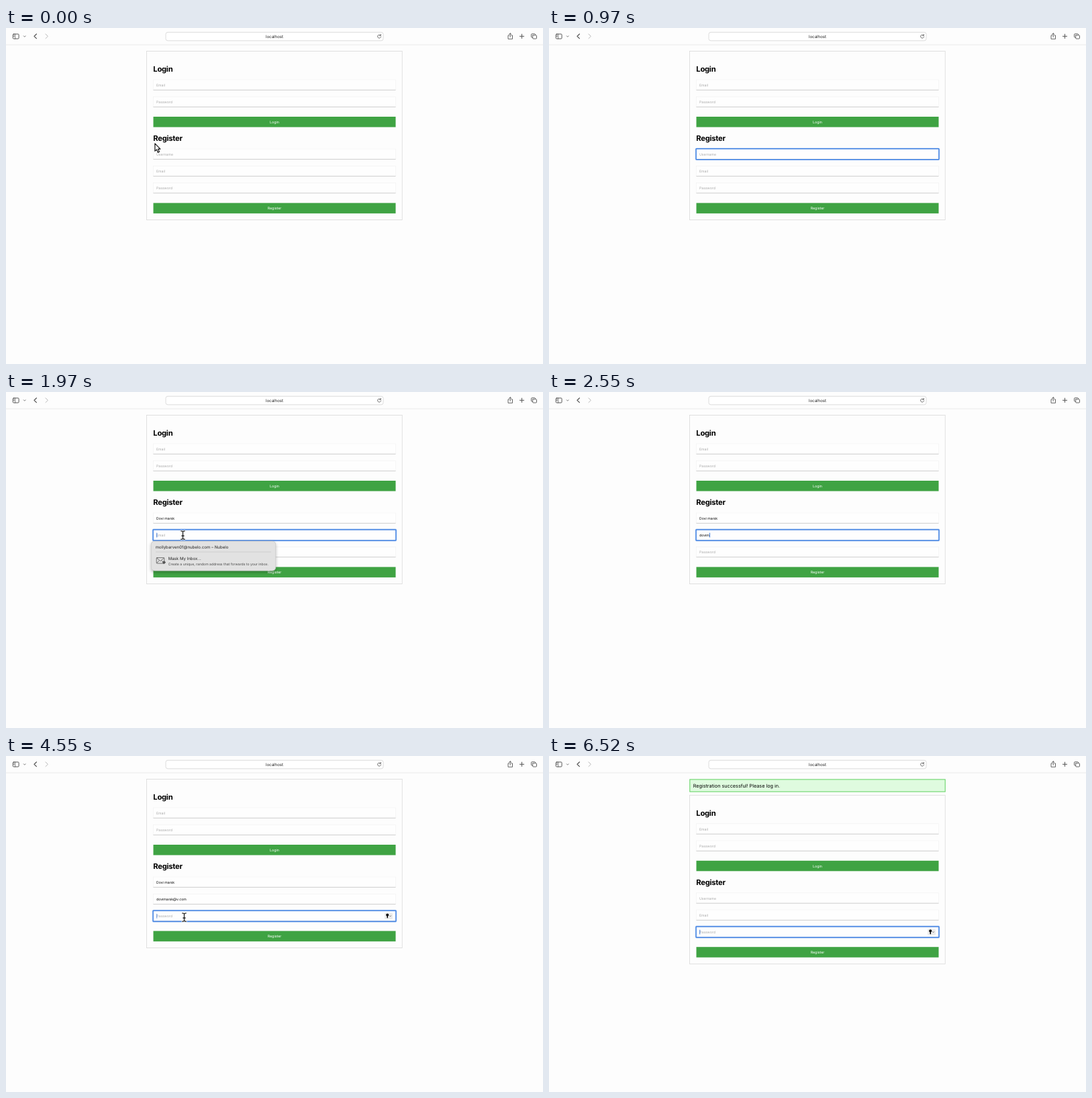
An HTML page that plays this animation: 800 px wide and 500 px high, repeating every 6.55 s.

```html
<!DOCTYPE html>
<html lang="en">
<head>
<meta charset="utf-8">
<title>Login and register</title>
<style>
html, body { margin: 0; width: 100%; height: 100%; overflow: hidden; background: #fdfdfd; }
svg { display: block; width: 800px; height: 500px; }
text { font: 5.15px Inter, "Open Sans", sans-serif; text-rendering: geometricPrecision; white-space: pre; }
.h { font-size: 11.23px; font-weight: 700; letter-spacing: -.25px; }
.ph { fill: #a9a9a9; }
.btn { font-size: 5.35px; fill: #fff; text-anchor: middle; }
.ui { font-size: 6.1px; fill: #222; }
.line { fill: none; stroke: #555; stroke-width: 1; stroke-linecap: round; stroke-linejoin: round; }
</style>
</head>
<body>
<svg id="stage" viewBox="0 0 800 500"></svg>
<script>
const LOOP = 6550, SUBMIT = 5850, DOT = 3.5;
const NAME = "Dovi marsk", EMAIL = "dovimarsk@v.com";
const $ = id => document.getElementById(id);

const field = (id, y, label) => `
  <rect x="219.6" y="${y}" width="360.8" height="15.4" fill="#fefefe" stroke="#f0f0f0" stroke-width=".6"/>
  <path d="M219.5 ${y + 15.3}H580.5" stroke="#c6c6c6" stroke-width=".8"/>
  <text id="${id}" class="ph" x="224" y="${y + 9.8}">${label}</text>`;
const button = (y, label) => `
  <rect x="219.5" y="${y}" width="361" height="15.5" fill="#3fa343"/>
  <text class="btn" x="400" y="${y + 9.9}">${label}</text>`;
const dots = [0, 1, 2, 3].map(i => `<circle cx="${226.2 + i * DOT}" cy="238.3" r="1.3"/>`).join("");

$("stage").innerHTML = `
<defs><filter id="shadow" x="-10%" y="-30%" width="120%" height="170%">
  <feDropShadow dx="0" dy="2" stdDeviation="2" flood-opacity=".28"/></filter></defs>
<rect width="800" height="500" fill="#fdfdfd"/>
<path d="M0 25H800" stroke="#ebebeb"/>
<rect x="238" y="6.3" width="324" height="12.6" rx="3" fill="#fff" stroke="#d9d9d9" stroke-width=".9"/>
<text class="ui" x="400" y="14.9" text-anchor="middle">localhost</text>
<g class="line">
  <rect x="10.3" y="9" width="8.8" height="7" rx="1.2"/>
  <path d="M13.6 9V16M11.4 11H12.4M11.4 12.7H12.4" stroke-width=".7"/>
  <path d="M26.3 11.8L27.7 13.2L29.1 11.8" stroke-width=".8"/>
  <path d="M45.4 9L42 12.3L45.4 15.6" stroke-width="1.2"/>
  <path d="M59 9L62.4 12.3L59 15.6" stroke="#bbb"/>
  <path d="M558.2 11.2A2.5 2.5 0 1 0 558.6 13M556.4 11.2H558.3V9.3" stroke-width=".8"/>
  <path d="M749.5 11H748V16.3H754.5V11H753M751.2 13.4V8M749.5 9.5L751.2 7.8L752.9 9.5" stroke-width=".9"/>
  <path d="M765.4 12.3H771.6M768.5 9.2V15.4"/>
  <path d="M784.7 10.7V15A1 1 0 0 0 785.7 16H789.5A1 1 0 0 0 790.5 15V11.7A1 1 0 0 0 789.5 10.7H784.7M784.5 14H783.5A1 1 0 0 1 782.5 13V9.7A1 1 0 0 1 783.5 8.7H787.5A1 1 0 0 1 788.5 9.7V10.4" stroke-width=".9"/>
</g>
<g id="notice">
  <rect x="209.8" y="34.9" width="380.4" height="18.2" fill="#dffbdf" stroke="#6bd56b" stroke-width="1.1"/>
  <text x="214.7" y="46.7" style="font-size:7.25px">Registration successful! Please log in.</text>
</g>
<g id="page">
  <rect x="209.5" y="34.5" width="380.7" height="251" fill="none" stroke="#d9d9d9" stroke-width=".8"/>
  <text class="h" x="219.3" y="65.1">Login</text>
  ${field("loginEmail", 77, "Email")}${field("loginPass", 102.2, "Password")}${button(132, "Login")}
  <text class="h" x="219.3" y="168.1">Register</text>
  ${field("user", 180, "Username")}${field("email", 205.2, "Email")}${field("pass", 230.4, "Password")}
  ${button(260.4, "Register")}
  <g id="dots">${dots}</g>
  <g id="ring" fill="none">
    <rect x="218.8" y="-.6" width="362.4" height="16.6" rx="1" stroke="#a9c8f6" stroke-width="2"/>
    <rect x="219.1" y="-.3" width="361.8" height="16" rx=".6" stroke="#397ce0" stroke-width="1.2"/>
    <rect id="caret" y="4.4" width=".9" height="6.8" fill="#2f70d8"/>
  </g>
  <g id="key">
    <rect x="564" y="233.6" width="12" height="9.4" rx="1.5" fill="#ececec"/>
    <circle cx="568.2" cy="236.4" r="2"/><path d="M567.5 237H569V240.6L568.2 241.6L567.5 240.8Z"/>
    <path class="line" d="M571.6 237.8L572.6 238.8L573.6 237.8" style="stroke-width:.8"/>
  </g>
</g>
<g id="popup">
  <rect x="216.2" y="222" width="185.6" height="44" rx="5" fill="#e2e2e2" stroke="#bdbdbd" stroke-width=".6" filter="url(#shadow)"/>
  <text class="ui" x="222.7" y="232.9">mollybarven01@nubelo.com – Nubelo</text>
  <path d="M223 238H395" stroke="#c6c6c6" stroke-width=".7"/>
  <g class="line" style="stroke-width:.8">
    <rect x="224.2" y="246.6" width="11.6" height="8.4" rx="1"/>
    <path d="M224.6 247L230 251.6L235.4 247M224.6 254.6L228.4 250.6M235.4 254.6L231.6 250.6"/>
    <circle cx="235.4" cy="253.6" r="1.8" fill="#555"/>
  </g>
  <text class="ui" x="241.7" y="250">Mask My Inbox...</text>
  <text x="241.7" y="257.7" fill="#4a4a4a">Create a unique, random address that forwards to your inbox.</text>
</g>
<path id="arrow" d="M0 0V11.2L2.6 8.9L4.4 13.2L6.5 12.3L4.7 8.1H8Z" fill="#fff" stroke="#111" stroke-width="1.2" stroke-linejoin="round"/>
<g id="beam" fill="none" stroke-linecap="round">
  <path d="M-2.8 -6.2Q0 -6.2 0 -4.4Q0 -6.2 2.8 -6.2M0 -4.4V4.4M-2.8 6.2Q0 6.2 0 4.4Q0 6.2 2.8 6.2M-1.6 1H1.6" stroke="#fff" stroke-width="2.6"/>
  <path d="M-2.8 -6.2Q0 -6.2 0 -4.4Q0 -6.2 2.8 -6.2M0 -4.4V4.4M-2.8 6.2Q0 6.2 0 4.4Q0 6.2 2.8 6.2M-1.6 1H1.6" stroke="#222" stroke-width="1.3"/>
</g>`;

// Key points: [time, value, ...]
const POINTER = [
  [0, 222, 172], [160, 206, 164], [320, 224, 147], [480, 272, 172], [580, 284, 187],
  [670, 274, 158], [700, 273, 190.5], [1550, 273, 190.5], [1790, 263.5, 213],
  [3900, 263.5, 213], [4060, 268, 222], [4270, 265.5, 240], [LOOP, 265.5, 240]];
const CARET = [
  [0, 1], [880, 1], [940, 0], [1029, 0], [1030, 1], [2030, 1], [2150, 0], [2239, 0], [2240, 1],
  [3250, 1], [3450, 0], [3639, 0], [3640, 1], [4520, 1], [4550, .8], [4730, 0], [4939, 0], [4940, 1],
  [5579, 1], [5580, .35], [5700, 0], [SUBMIT - 1, 0], [SUBMIT, 1], [5970, 1], [6120, 0], [6240, 0], [6480, 1], [LOOP, 1]];

function at(keys, t) {
  const i = Math.max(1, keys.findIndex(k => k[0] >= t)), a = keys[i - 1], b = keys[i];
  const p = (t - a[0]) / (b[0] - a[0]);
  return a.slice(1).map((v, j) => v + (b[j + 1] - v) * p);
}
const typed = (t, start, step, max) => Math.max(0, Math.min(max, Math.floor((t - start) / step) + 1));
const show = (id, on) => $(id).setAttribute("opacity", +on);
const move = (id, x, y) => $(id).setAttribute("transform", `translate(${x} ${y})`);

function setField(id, value, label) {
  const el = $(id);
  el.textContent = value || label;
  el.setAttribute("class", value ? "" : "ph");
  return value ? el.getComputedTextLength() : 0;
}

function draw(t) {
  const done = t >= SUBMIT;
  const count = typed(t, 2270, 65, 9) + typed(t, 3000, 1, 1) + typed(t, 3640, 60, 5);
  const bullets = done ? 0 : typed(t, 4970, 100, 4);
  const widths = [
    setField("user", done ? "" : NAME.slice(0, typed(t, 1030, 50, 10)), "Username"),
    setField("email", done ? "" : EMAIL.slice(0, count), "Email"),
    bullets * DOT];
  const focus = t < 1790 ? 0 : t < 4300 ? 1 : 2;

  show("notice", done);
  move("page", 0, done ? 23.8 : 0);
  show("pass", !bullets);
  [...$("dots").children].forEach((d, i) => d.setAttribute("opacity", +(i < bullets)));
  show("ring", t >= 700);
  move("ring", 0, 180 + focus * 25.2);
  $("caret").setAttribute("x", 224.3 + widths[focus]);
  show("caret", at(CARET, t)[0]);
  show("key", focus === 2);
  show("popup", t < 1850 ? 0 : Math.max(0, Math.min(1, (2400 - t) / 130)));

  const [x, y] = at(POINTER, t);
  const visible = t < 880 || t >= 1550 && t < 2270 || t >= 3900 && t < 4960;
  const overField = x > 219 && [180, 205.2, 230.4].some(top => y >= top && y <= top + 15.4);
  show("arrow", visible && !overField);
  show("beam", visible && overField);
  move("arrow", x, y);
  move("beam", x, y);
}

function tick() {
  draw(performance.now() % LOOP);
  requestAnimationFrame(tick);
}
tick();
</script>
</body>
</html>
```
